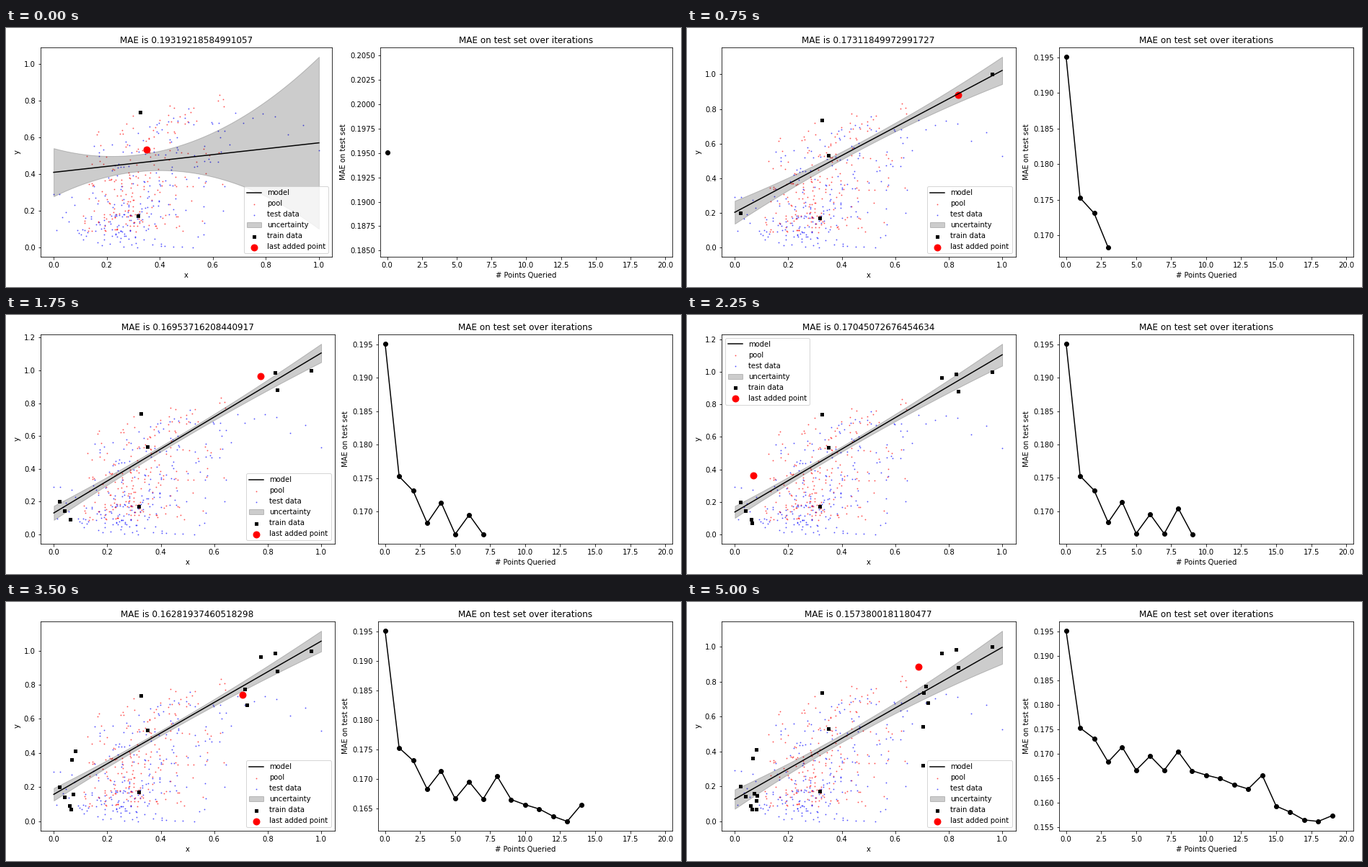
A matplotlib script that plays this animation: 936x360 px, repeating every 5.25 s.

```python
import matplotlib.pyplot as plt
import numpy as np
from matplotlib.animation import FuncAnimation

FRAMES = 21
INTERVAL = 250

# Starting pair, then the points in the order they are queried.
SAMPLES = np.array([
    (0.325, 0.737), (0.317, 0.172), (0.351, 0.533), (0.963, 1.0),
    (0.022, 0.2), (0.836, 0.882), (0.039, 0.144), (0.827, 0.985),
    (0.06, 0.092), (0.774, 0.966), (0.063, 0.07), (0.068, 0.364),
    (0.722, 0.68), (0.071, 0.161), (0.714, 0.775), (0.079, 0.412),
    (0.707, 0.74), (0.0795, 0.12), (0.704, 0.32), (0.0795, 0.07),
    (0.704, 0.545), (0.084, 0.147), (0.687, 0.888),
])

# Error of the first model, then after each query.
ERRORS = [
    0.19319218584991057, 0.19508462137405918, 0.17526813904275163,
    0.17311849972991727, 0.16831527460918352, 0.1713744440380706,
    0.16665820417395264, 0.16953716208440917, 0.16661938520714836,
    0.17045072676454634, 0.16652094173586215, 0.16563871950426183,
    0.1649270097688196, 0.16368415927034815, 0.16281937460518297,
    0.16563042817395016, 0.15931464379598173, 0.15808261749305827,
    0.15649173820564193, 0.15619402857316482, 0.1573800181180477,
]


def cloud(rng, low=85, spread=125):
    """A dense low cluster under a wide band whose top rises with x."""
    x = np.append(rng.normal(0.24, 0.08, low), rng.beta(4, 6.5, spread))
    top = 0.6 + 0.5 * x
    y = 0.05 + (top - 0.05) * rng.beta(1.8, 1.5, len(x))
    y[:low] = 0.05 + 0.4 * rng.beta(2, 3.2, low)
    keep = (x > 0.09) & (x < 0.66)
    return np.array([x[keep], y[keep]])


def tails(rng, left=9, right=13):
    """Sparse points on both sides, reaching the ends of the unit range."""
    x = np.append(np.linspace(0, 0.09, left), 0.62 + 0.38 * np.linspace(0, 1, right) ** 2)
    y = np.append(rng.uniform(0.17, 0.37, left), rng.normal(0.74, 0.07, right))
    return np.array([x, y])


rng = np.random.default_rng(12)
pool = cloud(rng)
test = np.hstack([cloud(rng), tails(rng)])
test[1] -= test[1].min()
grid = np.linspace(0, 1, 100)


def predict(k):
    """Ridge line through the queried points and its uncertainty."""
    if k == 0:  # dominated by the prior
        return 0.41 + 0.161 * grid, 0.046 + 0.89 * (grid - 0.31) ** 2
    x, y = SAMPLES[:k + 3].T
    n = len(x)
    dx, dy = x - x.mean(), y - y.mean()
    d = grid - x.mean()
    sxx = dx @ dx + 0.5 / n ** 2
    slope = dx @ dy / sxx
    rss = dy @ dy - slope * (dx @ dy)
    spread = (0.9 - 0.7 / n) * rss * (1 / n + d ** 2 / sxx)
    return y.mean() + slope * d, spread


fig, (left, right) = plt.subplots(1, 2, figsize=(13, 5), dpi=72)
margins = {side: plt.rcParams[f"figure.subplot.{side}"]
           for side in ("left", "right", "bottom", "top", "wspace", "hspace")}


def draw_model(k):
    mean, spread = predict(k)
    left.clear()
    left.plot(grid, mean, color="black", label="model")
    left.scatter(*pool, s=1, color="red", alpha=0.5, label="pool")
    left.scatter(*test, s=1, color="blue", alpha=0.5, label="test data")
    left.fill_between(grid, mean - spread, mean + spread, color="black",
                      alpha=0.2, label="uncertainty")
    left.scatter(*SAMPLES[:k + 2].T, s=16, marker="s", color="black",
                 label="train data")
    left.scatter(*SAMPLES[k + 2], s=80, color="red", label="last added point")
    left.set(title=f"MAE is {ERRORS[k]}", xlabel="x", ylabel="y")
    left.legend(loc="upper left" if k in (8, 9) else "lower right")


def draw_errors(k):
    history = ERRORS[1:k + 2]
    right.clear()
    right.plot(range(len(history)), history, "o-", color="black")
    right.set(title="MAE on test set over iterations", xlim=(-0.5, 20.5),
              xlabel="# Points Queried", ylabel="MAE on test set")


def update(k):
    draw_model(k)
    draw_errors(k)
    # The margins settle over the first passes.
    fig.subplots_adjust(**margins)
    for _ in range(2 + min(k, 2)):
        fig.tight_layout()


anim = FuncAnimation(fig, update, frames=FRAMES, interval=INTERVAL,
                     repeat=True, repeat_delay=0)
plt.show()
```
